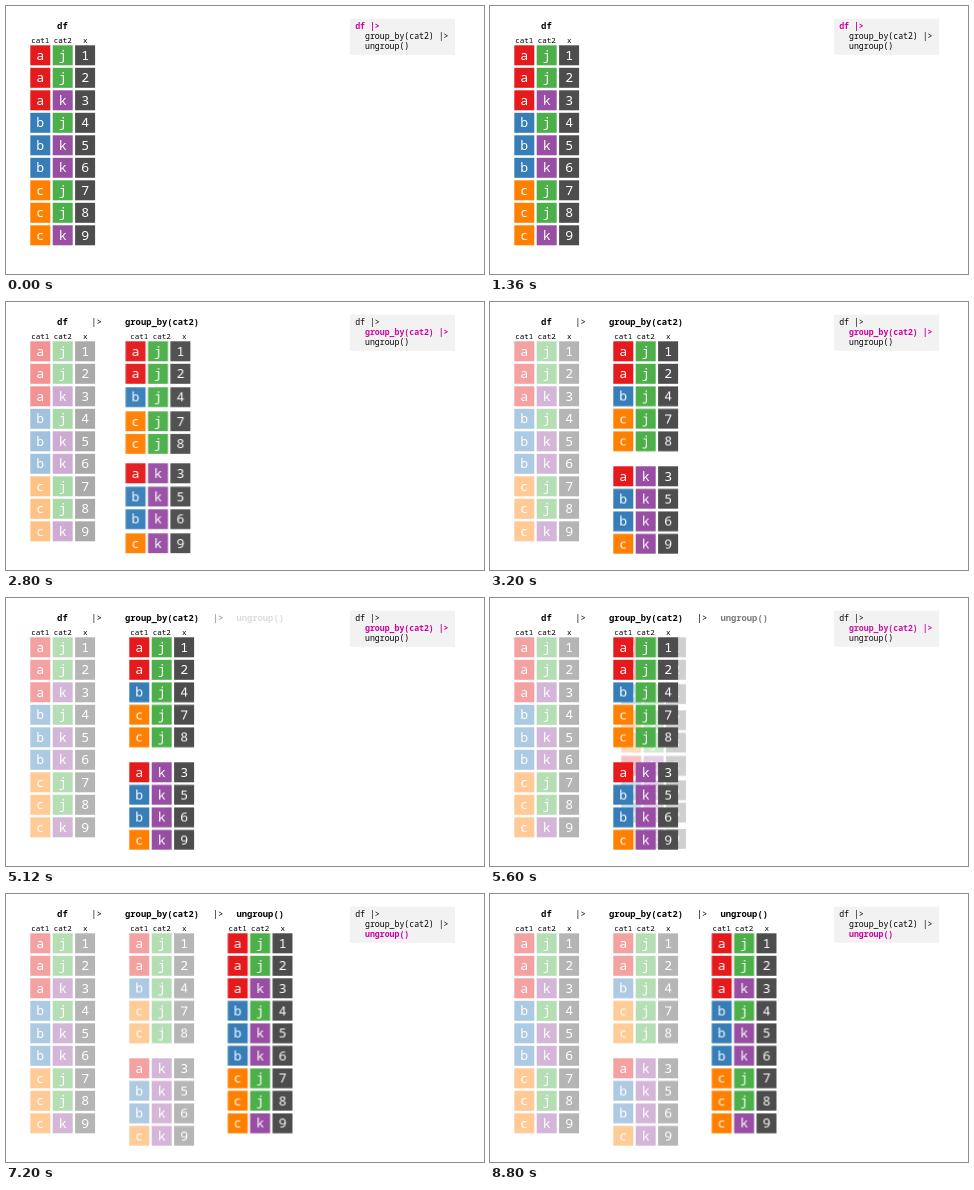
Write an HTML page that moves like this. It is 478x268 px and loops after 9.04 s.

```html
<!DOCTYPE html>
<html lang="en">
<head>
<meta charset="utf-8">
<title>Grouping and ungrouping</title>
<style>
  html, body { margin: 0; width: 100%; height: 100%; overflow: hidden; background: #fff; }
  svg { display: block; width: 478px; height: 268px; }
  text { font-family: "Noto Sans Mono", "DejaVu Sans Mono", monospace; white-space: pre; }
  .title { font-size: 8.8px; text-anchor: middle; }
  .label { font-size: 7.6px; text-anchor: middle; }
  .cell { font-size: 13.2px; text-anchor: middle; fill: #fff; }
  .code { font-size: 8.2px; }
  .bold { font-weight: 700; }
  .hot { font-weight: 700; fill: #cc00a0; }
</style>
</head>
<body>
<svg id="stage" viewBox="0 0 478 268"></svg>
<script>
const LOOP = 9040;
const STEP = 3200;            // second move repeats the first one this much later
const MOVE = [2208, 2942];
const EASE = 'cubic-bezier(.65, 0, .35, 1)';
const DIM = 0.41;
const PITCH = 22.5, SIZE = 20, TOP = 39.3;
const COLORS = { a: '#e41a1c', b: '#377eb8', c: '#ff7f00', j: '#4daf4a', k: '#984ea3' };
const TABLE_X = [24.3, 123.3, 221.7];

const rows = [...'jjkjkkjjk'].map((cat2, i) => ['abc'[Math.floor(i / 3)], cat2, String(i + 1)]);
const flatY = rows.map((_, i) => TOP + i * PITCH);

// Rows sorted by cat2, with a gap between the two groups.
const order = [0, 1, 3, 6, 7, 2, 4, 5, 8];
const groupY = [];
order.forEach((row, slot) => groupY[row] = TOP + slot * PITCH + (slot > 4 ? 12.5 : 0));

const stage = document.getElementById('stage');

function add(parent, tag, attrs = {}, content = '') {
  const el = document.createElementNS('http://www.w3.org/2000/svg', tag);
  for (const key in attrs) el.setAttribute(key, attrs[key]);
  el.textContent = content;
  parent.appendChild(el);
  return el;
}

function text(parent, cls, x, y, content) {
  return add(parent, 'text', { class: cls, x, y }, content);
}

// points: [time, value], held before the first and after the last
function animate(el, prop, points, easing = 'linear') {
  const all = [[0, points[0][1]], ...points, [LOOP, points[points.length - 1][1]]];
  el.animate(
    all.map(([time, value]) => ({ offset: time / LOOP, [prop]: value, easing })),
    { duration: LOOP, iterations: Infinity }
  );
}

const fade = (el, points, shift = 0) =>
  animate(el, 'opacity', points.map(([time, value]) => [time + shift, value]));

function drawRow(parent, row, x, y) {
  const g = add(parent, 'g');
  row.forEach((value, col) => {
    const left = x + col * 22.4;
    add(g, 'rect', { x: left, y, width: SIZE, height: SIZE, fill: COLORS[value] || '#4d4d4d' });
    text(g, 'cell', left + SIZE / 2, y + 14.4, value);
  });
  return g;
}

function drawLabels(x) {
  const g = add(stage, 'g');
  ['cat1', 'cat2', 'x'].forEach((name, col) =>
    text(g, 'label', x + SIZE / 2 + col * 22.5, 37, name));
  return g;
}

function dim(table, shift) {
  fade(table, [[2440, 1], [2560, .92], [2720, .53], [2890, DIM]], shift);
}

// Rows leave one layout and settle in the next one.
function moveRows(list, index, from, to) {
  const shift = (index - 1) * STEP;
  const [start, end] = MOVE.map(t => t + shift);
  const layer = add(stage, 'g');
  const dx = TABLE_X[index - 1] - TABLE_X[index];
  for (const i of list) {
    const g = drawRow(layer, rows[i], TABLE_X[index], to[i]);
    const away = `translate(${dx}px, ${from[i] - to[i]}px)`;
    animate(g, 'transform', [[start, away], [end, 'translate(0px, 0px)']], EASE);
    animate(g, 'opacity', [[start - 1, 0], [start, .2], [end, 1]], EASE);
  }
  return layer;
}

function startRows(from, to) {
  const layer = add(stage, 'g');
  for (let i = from; i < to; i++) drawRow(layer, rows[i], TABLE_X[0], flatY[i]);
  dim(layer, 0);
}

// Bottom to top: the two groups slide between the layers of the first table.
moveRows(order, 2, groupY, flatY);
dim(moveRows(order.slice(5), 1, flatY, groupY), STEP);
startRows(3, 9);
dim(moveRows(order.slice(0, 5), 1, flatY, groupY), STEP);
startRows(0, 3);

TABLE_X.forEach((x, i) => {
  const labels = drawLabels(x);
  if (i) fade(labels, [[2460, 0], [2560, .13], [2720, .88], [2880, 1]], (i - 1) * STEP);
});

text(stage, 'title bold', 56.4, 22.6, 'df');
[['group_by(cat2)', 156, 90.6], ['ungroup()', 254.2, 212]].forEach(([name, x, pipeX], i) => {
  const pipe = text(stage, 'title', pipeX, 22.6, '|>');
  const title = text(stage, 'title bold', x, 22.6, name);
  fade(pipe, [[1560, 0], [1920, .5], [2240, .9], [2400, 1]], i * STEP);
  fade(title, [[1760, 0], [1920, .14], [2560, .65], [2720, .97], [2880, 1]], i * STEP);
});

// Code panel: each line has a plain and a highlighted layer.
add(stage, 'rect', { x: 344, y: 12.6, width: 105, height: 36.2, fill: '#f2f2f2' });
const span = (shift, a, b) => [[MOVE[0] + shift, a], [MOVE[1] + shift, b]];
const lit = [
  span(0, 1, 0),
  [...span(0, 0, 1), ...span(STEP, 1, 0)],
  span(STEP, 0, 1)
];
['df |>', 'group_by(cat2) |>', 'ungroup()'].forEach((line, i) => {
  const x = i ? 359 : 349.2, y = 22.8 + i * 10.1;
  const plain = text(stage, 'code', x, y, line);
  const hot = text(stage, 'code hot', x, y, line);
  animate(hot, 'opacity', lit[i], EASE);
  animate(plain, 'opacity', lit[i].map(([time, value]) => [time, 1 - value]), EASE);
});
</script>
</body>
</html>
```
